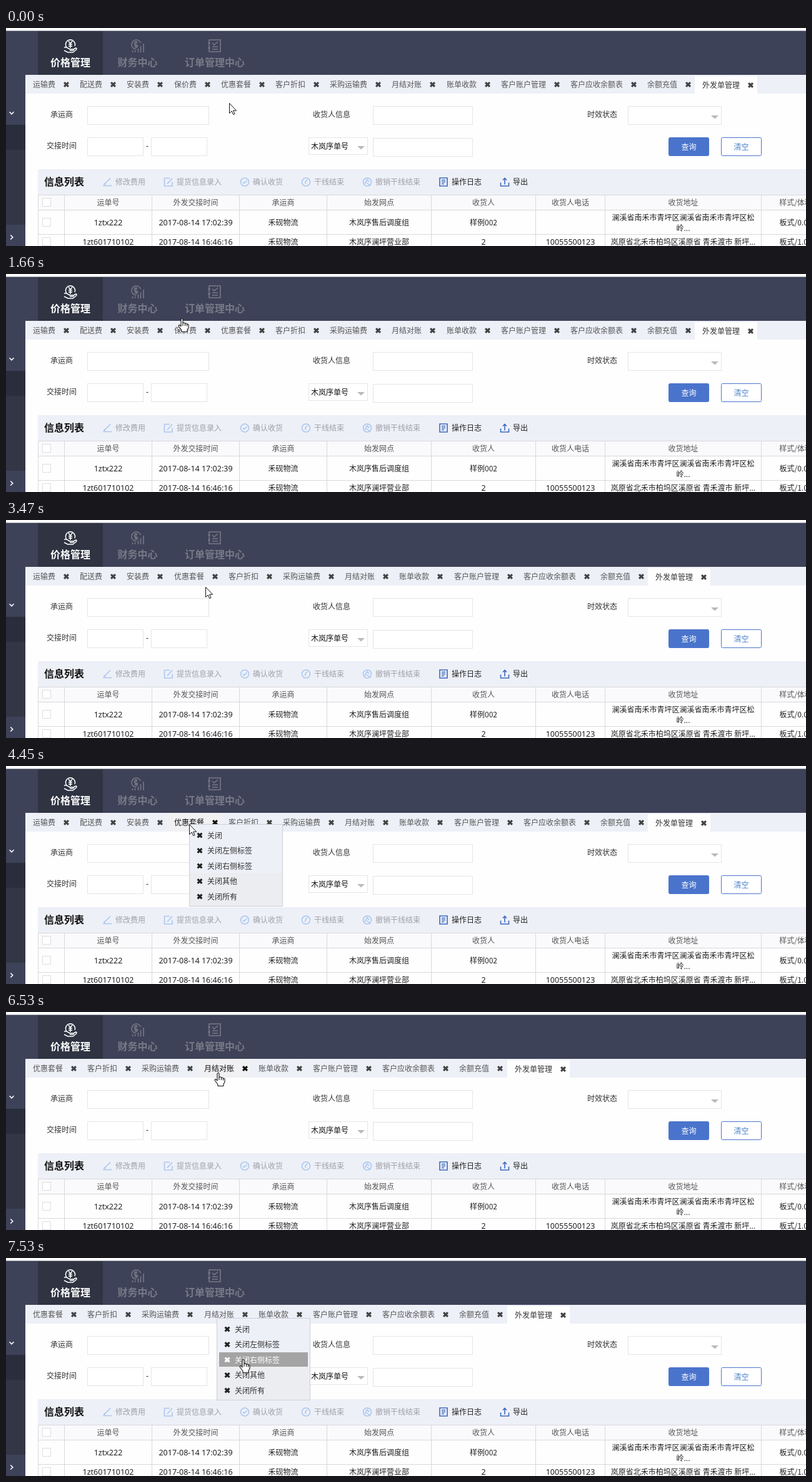
Animation of 1280 by 349 pixels, one loop 8000 ms. Source, as an HTML page:

```html
<!DOCTYPE html>
<html lang="zh-CN">
<head>
<meta charset="utf-8">
<title>标签页右键菜单</title>
<style>
html, body { margin: 0; width: 100%; height: 100%; overflow: hidden; background: #fff; }
svg { display: block; width: 100%; height: 100%; }
text { font: 12px "Noto Sans CJK SC", "Noto Sans CJK", sans-serif; white-space: pre; }
.latin { font: 12.5px "Noto Sans", sans-serif; }
.big { font-size: 16px; font-weight: 700; }
.icon { fill: none; stroke-width: 1.6; }
</style>
</head>
<body>
<svg id="stage" viewBox="0 0 1280 349"></svg>
<script>
const LOOP = 8000, GLYPH = 12;
const HEADER = '#3e4258', BAR = '#eef0f8', LINE = '#d9d9dc', FIELD = '#e5e5e8', BLUE = '#4a74cc';
const stage = document.getElementById('stage');

function add(parent, tag, attrs, content) {
  const node = document.createElementNS('http://www.w3.org/2000/svg', tag);
  for (const key in attrs) node.setAttribute(key, attrs[key]);
  if (content !== undefined) node.textContent = content;
  parent.append(node);
  return node;
}
const group = () => add(stage, 'g', {});
const fill = (x, y, width, height, color, parent = stage) =>
  add(parent, 'rect', { x, y, width, height, fill: color });
const frame = (x, y, w, h, { edge = FIELD, inside = '#fff', rx = 0, parent = stage } = {}) =>
  add(parent, 'rect', { x: x + .5, y: y + .5, width: w - 1, height: h - 1, rx, fill: inside, stroke: edge });
const label = (x, mid, content, color = '#333', cls = '', parent = stage, anchor = 'start') =>
  add(parent, 'text', { x, y: mid + (cls === 'big' ? 6 : 4.5), fill: color, class: cls, 'text-anchor': anchor }, content);
const centred = (x, mid, content, color, cls) => label(x, mid, content, color, cls, stage, 'middle');
const icon = (x, y, d, stroke) =>
  add(stage, 'path', { d, stroke, class: 'icon', transform: `translate(${x} ${y})` });
const cross = (x, y, parent) =>
  add(parent, 'path', { d: 'M-3.4-3.4 3.4 3.4M3.4-3.4-3.4 3.4', 'stroke-width': 3.2, transform: `translate(${x} ${y})` });
const place = (node, x, y) => node.setAttribute('transform', `translate(${x} ${y})`);
const show = (node, on) => node.setAttribute('visibility', on ? 'visible' : 'hidden');

function drawShell() {
  fill(0, 0, 1280, 349, '#fefefe');
  fill(0, 4, 1280, 1, '#a5a7b2');
  fill(0, 5, 1280, 70, HEADER);
  fill(0, 75, 31, 274, HEADER);
  fill(0, 155, 31, 160, '#323645');
  fill(0, 155, 31, 40, '#2a2d3c');
  fill(51, 5, 104, 70, '#2f3342');
  icon(9, 136, 'M-3.5-1.7 0 1.8 3.5-1.7', '#fff');
  icon(9, 335, 'M-1.7-3.5 1.8 0-1.7 3.5', '#fff');
  const sections = [
    ['价格管理', 'M-6 3A7.5 7.5 0 1 1 7 1M-3-7 0-3 3-7M0-3V4M-3-2H3M-3 1H3M-10 3H-6L-1 6H5Q6 8 3 8H-1M5 6 9 4Q11 5 9 7L4 11H-4L-10 8'],
    ['财务中心', 'M-2 6A7.5 7.5 0 1 1 5-4M0-5Q-5-7-5-3T0 0Q1 4-5 2M-2.5-7V4M1 11V5M5 11V1M9.5 11V-3M-8 8V11M-4 8V11'],
    ['订单管理中心', 'M-9-9H9V10H-9ZM-11-4H-7M-11 4H-7M-4-4-1-1 5-6M-4 2H5M-4 6H5']
  ];
  let x = 71;
  sections.forEach(([name, d], i) => {
    const width = name.length * 16, color = i ? '#777986' : '#fff';
    label(x, 55, name, color, 'big');
    icon(x + width / 2, 28, d, color);
    x += width + 43.5;
  });
}

function drawForm() {
  const select = (x, y, w, h) => {
    frame(x, y, w, h);
    add(stage, 'path', { d: `M${x + w - 17} ${y + h / 2}h12l-6 5.5z`, fill: '#b9b9b9' });
  };
  label(71, 138.5, '承运商');
  frame(130, 125, 195, 30);
  label(491, 138.5, '收货人信息');
  frame(587, 125, 160, 30);
  label(930, 138.5, '时效状态');
  select(995, 125, 150, 30);
  label(65, 188.5, '交接时间');
  frame(130, 175, 90, 30);
  label(224, 188.5, '-', '#333', 'latin');
  frame(232, 175, 90, 30);
  select(484, 175, 95, 28);
  label(488, 189, '木岚序单号', '#111');
  frame(587, 176, 160, 30);
  frame(1060, 175, 65, 30, { edge: BLUE, inside: BLUE, rx: 2 });
  centred(1092.5, 190, '查询', '#fff');
  frame(1144, 175, 65, 30, { edge: BLUE, rx: 2 });
  centred(1176.5, 190.5, '清空', '#4a80c8');
}

function drawToolbar() {
  fill(51, 226, 1229, 41, BAR);
  label(61, 246, '信息列表', '#111', 'big');
  const ring = 'M-6.5 0A6.5 6.5 0 1 0 6.5 0A6.5 6.5 0 1 0-6.5 0';
  const tools = [
    ['修改费用', 'M-7 6H7M-4 3 5-6M-5 2V4H-3'],
    ['提货信息录入', 'M2-6H-6.5V6.5H6V0M-2 3 6-6'],
    ['确认收货', ring + 'M-3 0-1 2 3.5-2.5'],
    ['干线结束', ring + 'M2-4-1 0V3'],
    ['撤销干线结束', ring + 'M-4 3 0-4 3 0M-1 1 5 6'],
    ['操作日志', 'M-6-6.5H6V6.5H-6ZM-3-3H3M-3 0H3M-3 3H1'],
    ['导出', 'M-6.5 1V6.5H6.5V1M0 4V-6M-3-3 0-6 3-3']
  ];
  let x = 155;
  tools.forEach(([name, d], i) => {
    const enabled = i > 4;
    icon(x + 7, 246.5, d, enabled ? '#3c69bd' : '#aac8ee');
    label(x + 20, 246.5, name, enabled ? '#222' : '#a0a0a6');
    x += 50 + name.length * GLYPH;
  });
}

function drawTable() {
  // heading, width, first row, second row
  const columns = [
    ['', 42, '', ''],
    ['运单号', 140, '1ztx222', '1zt601710102'],
    ['外发交接时间', 140, '2017-08-14 17:02:39', '2017-08-14 16:46:16'],
    ['承运商', 140, '禾砚物流', '禾砚物流'],
    ['始发网点', 167, '木岚序售后调度组', '木岚序澜坪营业部'],
    ['收货人', 167, '样例002', '2'],
    ['收货人电话', 111, '', '10055500123'],
    ['收货地址', 250, '', '岚原省北禾市柏坞区溪原省 青禾渡市 新坪...'],
    ['样式/体积', 110, '板式/0.01', '板式/1.01']
  ];
  const cell = (x, y, content, color) =>
    centred(x, y, content, color, /^[ -~]+$/.test(content) ? 'latin' : '');
  fill(51, 267, 1229, 25, '#fafafc');
  for (const y of [267, 291, 330]) fill(51, y, 1229, 1, LINE);
  for (const y of [272, 304, 335]) frame(58, y, 14, 14, { edge: '#dedee2' });
  let x = 51;
  for (const [heading, width, first, second] of columns) {
    const mid = x + width / 2 + .5;
    fill(x, 267, 1, 82, LINE);
    cell(mid, 279.5, heading, '#555');
    cell(mid, 311.5, first, '#222');
    cell(mid, 342.5, second, '#222');
    x += width;
  }
  cell(1083.5, 303.5, '澜溪省南禾市青坪区澜溪省南禾市青坪区松', '#222');
  cell(1083.5, 320, '岭...', '#222');
}

drawShell();
drawForm();
drawToolbar();
drawTable();

fill(31, 75, 1249, 30, BAR);
const names = ['运输费', '配送费', '安装费', '保价费', '优惠套餐', '客户折扣', '采购运输费', '月结对账',
  '账单收款', '客户账户管理', '客户应收余额表', '余额充值', '外发单管理'];
const tabs = names.map((name, i) => {
  const active = i === names.length - 1;
  const size = name.length * GLYPH, width = size + 39.2;
  const node = group();
  const back = active ? fill(1, 77, 100, 28, '#fefefe', node) : fill(0, 75, width, 29, BAR, node);
  const shift = active ? 1 : 0;
  const text = label(12 + shift, 90 + shift, name, '#333', '', node);
  const close = cross(size + 29.5 + shift, 90.5 + shift, node);
  close.setAttribute('stroke', '#444');
  return { node, back, text, close, active, width };
});

const MENU_PITCH = 24.5;
const menu = group();
frame(0, 0, 150, 132, { edge: '#cfcfd6', inside: BAR, parent: menu });
fill(1, 78, 148, 53, '#ecedf1', menu);
const items = ['关闭', '关闭左侧标签', '关闭右侧标签', '关闭其他', '关闭所有'].map((name, i) => {
  const top = 6 + i * MENU_PITCH;
  return {
    top,
    back: fill(4, Math.round(top), 142, 23, '#a4a4a4', menu),
    close: cross(17, top + 12, menu),
    text: label(29, top + 12, name, '#333', '', menu)
  };
});

// Pointers, with the hot spot at 0,0
const outline = { fill: '#fff', stroke: '#111', 'stroke-linejoin': 'round' };
const arrow = add(stage, 'path', { ...outline, d: 'M.5.5V16.5L4.2 13 6.7 18.6 9 17.6 6.6 12.2H11.6Z' });
const hand = add(stage, 'path', { ...outline, 'stroke-width': 1.1,
  d: 'M-2 13V2Q-2 .5-.5 .5T1 2V7.5Q4 6 4.5 8.5Q7 7 7.5 9.5Q10 8.5 10 11V15L8 18.5V21.5H-1V19L-5.5 13Q-6.5 10.5-4.5 10.5Q-3.5 11-2 13ZM1 7V12M4.5 8.5V12M7.5 9.5V12.5' });

// Each move ends at x, y; lift bows it upwards
const HOME = { x: 357, y: 120 };
const moves = [
  { from: 150, to: 1080, x: 280, y: 113, lift: 22 },
  { from: 1230, to: 1660, x: 282, y: 71 },
  { from: 1810, to: 1970, x: 283, y: 86 },
  { from: 2380, to: 2640, x: 319, y: 107 },
  { from: 3750, to: 4170, x: 293, y: 93 },
  { from: 4590, to: 4880, x: 319, y: 133 },
  { from: 5700, to: 5980, x: 299, y: 98 },
  { from: 6260, to: 6530, x: 340, y: 97 },
  { from: 6830, to: 6830, x: 337, y: 96 },
  { from: 6970, to: 7530, x: 380, y: 162 }
];
const menuTimes = [[2250, 3470], [4450, 5560], [6830, LOOP]];

// The pointer is sampled about every 135 ms, so it moves in hard steps
function pointerAt(t) {
  let at = HOME;
  for (const { from, to, x, y, lift = 0 } of moves) {
    if (t < from) break;
    const steps = Math.round((to - from) / 135);
    const done = steps ? Math.min(steps, Math.floor((t - from) / (to - from) * steps)) : 0;
    const p = (done + 1) / (steps + 1);
    at = {
      x: Math.round(at.x + (x - at.x) * p),
      y: Math.round(at.y + (y - at.y) * p - lift * Math.sin(Math.PI * p))
    };
  }
  return at;
}

function render(t) {
  const { x, y } = pointerAt(t);
  const span = menuTimes.find(([from, to]) => t >= from && t < to);
  const corner = span && pointerAt(span[0]);
  const inMenu = corner && x > corner.x + 3 && y > corner.y + 3;

  let left = 31, overTab = false;
  tabs.forEach((tab, i) => {
    const closed = t >= 5560 ? i < 4 : t >= 3470 && i === 3;
    show(tab.node, !closed);
    if (closed) return;
    place(tab.node, Math.round(left), 0);
    if (!tab.active) {
      const hot = !inMenu && y >= 75 && y < 105 && x >= left && x < left + tab.width;
      tab.back.setAttribute('fill', hot ? '#f1f1f3' : BAR);
      tab.text.setAttribute('fill', hot ? '#111' : '#555');
      tab.close.setAttribute('stroke', hot ? '#111' : '#444');
      overTab ||= hot;
    }
    left += tab.width;
  });

  show(menu, span);
  if (span) place(menu, corner.x, corner.y);
  let overItem = false;
  for (const item of items) {
    const depth = inMenu ? y - corner.y - item.top : -1;
    const hot = depth >= 0 && depth < MENU_PITCH;
    item.back.setAttribute('fill', hot ? '#a4a4a4' : 'none');
    item.close.setAttribute('stroke', hot ? '#fff' : '#222');
    item.text.setAttribute('fill', hot ? '#fff' : '#333');
    overItem ||= hot;
  }

  const pointing = overItem || (!span && (overTab || y < 75));
  show(hand, pointing);
  show(arrow, !pointing);
  place(pointing ? hand : arrow, x, y);
}

const start = performance.now();
function tick() {
  render((performance.now() - start) % LOOP);
  requestAnimationFrame(tick);
}
tick();
</script>
</body>
</html>
```
